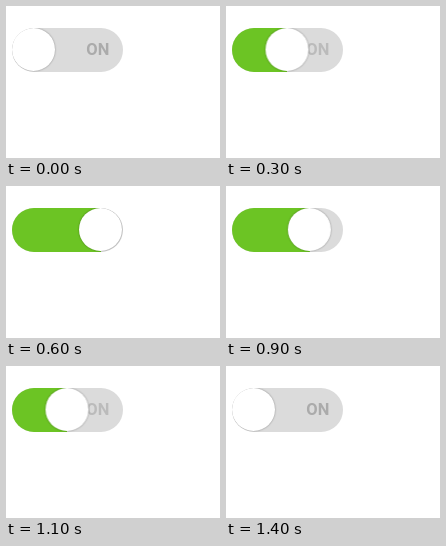
An HTML page for the animation above (1600 ms loop, 214 by 152 pixels).

```html
<!DOCTYPE html>
<html lang="en">
<head>
<meta charset="utf-8">
<title>Toggle switch</title>
<style>
  html, body {
    margin: 0;
    width: 100%;
    height: 100%;
    overflow: hidden;
    background: #fff;
  }
  .track {
    --travel: 67px;
    position: absolute;
    left: 5.5px;
    top: 21.5px;
    width: 111px;
    height: 44px;
    border-radius: 22px;
    background: #dbdbdb;
    overflow: hidden;
  }
  .label, .fill, .knob {
    position: absolute;
    animation: 1.6s infinite;
  }
  .label {
    left: 74.8px;
    top: 12.5px;
    font: bold 16.5px/20px Roboto, Arial, sans-serif;
    color: #ababab;
    animation-name: fade;
  }
  /* The right edge of the fill stays under the knob's centre. */
  .fill {
    left: -67px;
    top: 0;
    width: 89px;
    height: 44px;
    background: #6cc424;
    animation-name: slide, reveal;
  }
  .knob {
    left: .5px;
    top: .5px;
    width: 43px;
    height: 43px;
    border-radius: 50%;
    background: #fff;
    box-shadow: 0 0 2px rgba(0, 0, 0, .4);
    animation-name: slide;
  }
  @keyframes slide {
    0% { transform: none; animation-timing-function: steps(6, end); }
    37.5% { transform: translateX(var(--travel)); }
    50% { transform: translateX(var(--travel)); animation-timing-function: steps(6, end); }
    87.5%, 100% { transform: none; }
  }
  @keyframes fade {
    0% { opacity: 1; animation-timing-function: steps(6, end); }
    37.5% { opacity: .3; }
    50% { opacity: .3; animation-timing-function: steps(6, end); }
    87.5%, 100% { opacity: 1; }
  }
  @keyframes reveal {
    0% { opacity: 0; animation-timing-function: step-end; }
    6.25% { opacity: 1; animation-timing-function: step-end; }
    87.5%, 100% { opacity: 0; }
  }
</style>
</head>
<body>
  <div class="track">
    <span class="label">ON</span>
    <div class="fill"></div>
    <div class="knob"></div>
  </div>
</body>
</html>
```
